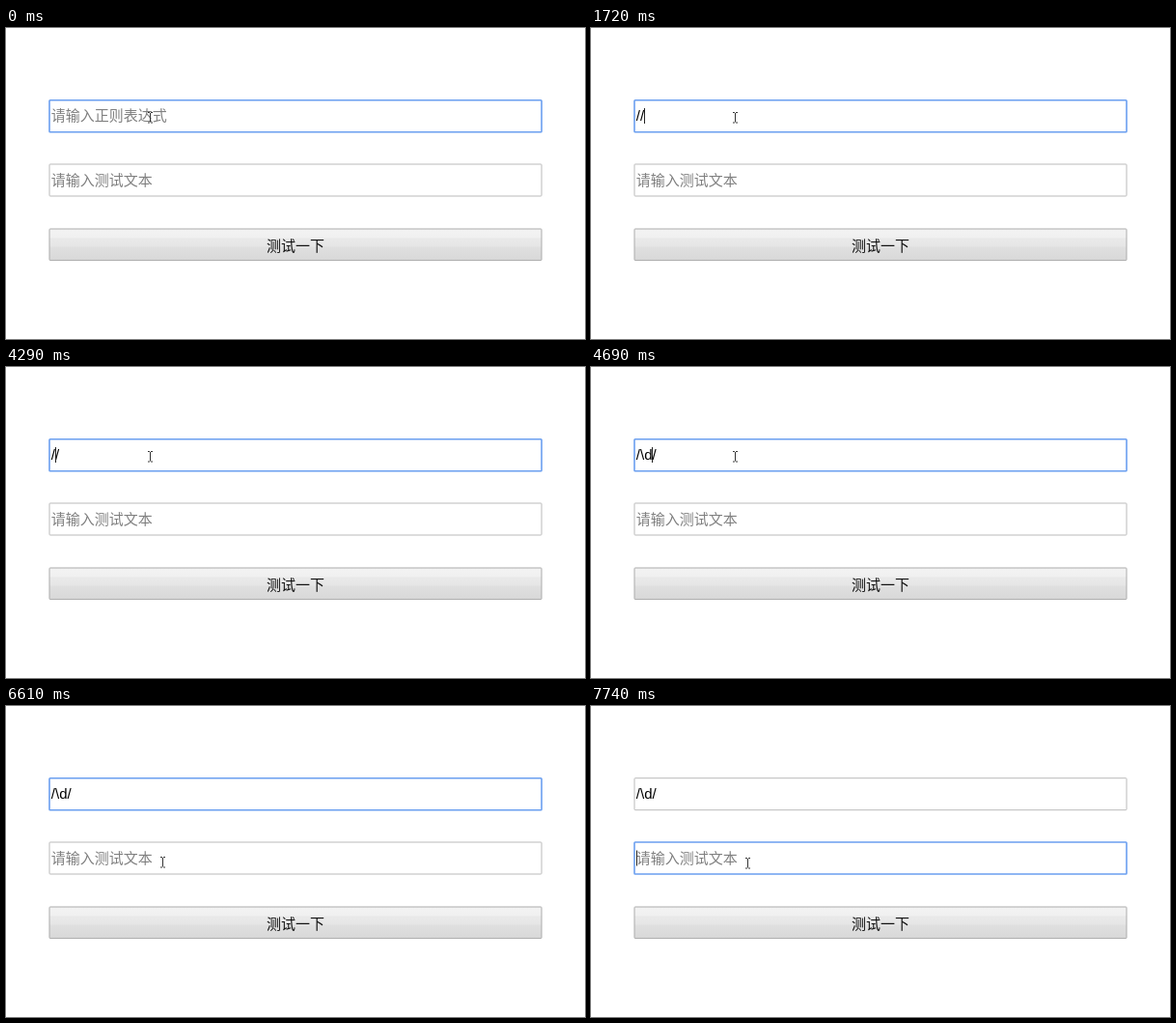
An HTML page for the animation above (8000 ms loop, 600 by 322 pixels).

```html
<!DOCTYPE html>
<html lang="zh">
<head>
<meta charset="utf-8">
<style>
  html, body { margin: 0; width: 100%; height: 100%; overflow: hidden; background: #fff; }
  svg { display: block; }
  text { font: 15px "Liberation Sans", "Noto Sans CJK SC", "Noto Sans CJK", sans-serif; white-space: pre; }
  .hint { fill: #808080; }
  .field { fill: #fff; stroke: #bababa; stroke-width: 1; }
  .field.focus { stroke: #6b9ff0; stroke-width: 1.6; }
  .caret { fill: #222; }
</style>
</head>
<body>
<svg width="600" height="322" viewBox="0 0 600 322">
  <defs>
    <linearGradient id="face" x1="0" y1="0" x2="0" y2="1">
      <stop offset="0" stop-color="#f3f3f3"/>
      <stop offset=".27" stop-color="#f0f0f0"/>
      <stop offset=".31" stop-color="#e9e9e9"/>
      <stop offset=".54" stop-color="#e6e6e6"/>
      <stop offset=".6" stop-color="#dfdfdf"/>
      <stop offset="1" stop-color="#d8d8d8"/>
    </linearGradient>
  </defs>
  <rect id="regexBox" class="field" x="45" y="74.7" width="510" height="33" rx=".8"/>
  <rect id="sampleBox" class="field" x="45" y="141" width="510" height="33" rx=".8"/>
  <rect x="45" y="208" width="510" height="32.6" rx=".8" fill="url(#face)" stroke="#ababab"/>
  <text id="regexHint" class="hint" x="46.8" y="96.4">请输入正则表达式</text>
  <text id="regexText" x="46.8" y="96"></text>
  <text class="hint" x="46.8" y="163">请输入测试文本</text>
  <text x="300" y="230.7" text-anchor="middle" fill="#111">测试一下</text>
  <rect id="caret" class="caret" width="1" height="16"/>
  <path id="beam" d="M-2.5 .5H-.6M.6 .5H2.5M0 1V10.5M-2.5 11H-.6M.6 11H2.5" fill="none" stroke="#333"/>
  <path id="arrow" d="M0 0V11.2L2.6 8.8L4.4 12.8L6.2 12L4.4 8.2H7.8Z" fill="#fff" stroke="#333" stroke-width=".9"/>
</svg>
<script>
const LOOP = 8000;
const $ = id => document.getElementById(id);

// Each step: [time, value]; the value holds until the next step.
const typed = [[0, ''], [680, '/'], [1720, '//'], [4410, '/\\/'], [4690, '/\\d/']];
const focus = [[0, 'regex'], [6760, 'sample']];
// Caret x, or null while it is hidden.
const caret = [
  [0, null], [120, 47], [680, 51], [1260, null], [1720, 55], [2290, null],
  [2750, 55], [3150, 51], [3740, null], [4290, 51], [4410, 55], [4690, 63],
  [5280, null], [5780, 63], [6330, null], [6760, 47], [7150, null], [7740, 47]
];
const pointer = [
  [0, ['beam', 149.5, 87]], [5930, ['beam', 164, 101]], [6060, ['arrow', 180, 116]],
  [6200, ['arrow', 173, 127]], [6330, ['beam', 163.5, 153]], [6450, ['beam', 162.5, 157]],
  [6610, ['beam', 162.5, 156]], [6880, ['beam', 162.5, 157]]
];

const at = (steps, t) => steps.filter(s => s[0] <= t).pop()[1];
const show = (el, on) => { el.style.visibility = on ? 'visible' : 'hidden'; };

function draw(t) {
  const text = at(typed, t), x = at(caret, t), target = at(focus, t);
  $('regexText').textContent = text;
  show($('regexHint'), !text);
  for (const name of ['regex', 'sample'])
    $(name + 'Box').classList.toggle('focus', name === target);

  show($('caret'), x !== null);
  $('caret').setAttribute('x', x ?? 0);
  $('caret').setAttribute('y', target === 'regex' ? 83 : 149.5);

  const [shape, px, py] = at(pointer, t);
  for (const name of ['beam', 'arrow']) show($(name), name === shape);
  $(shape).setAttribute('transform', `translate(${px} ${py})`);
}

const start = performance.now();
function tick() {
  draw((performance.now() - start) % LOOP);
  requestAnimationFrame(tick);
}
draw(0);
requestAnimationFrame(tick);
</script>
</body>
</html>
```
